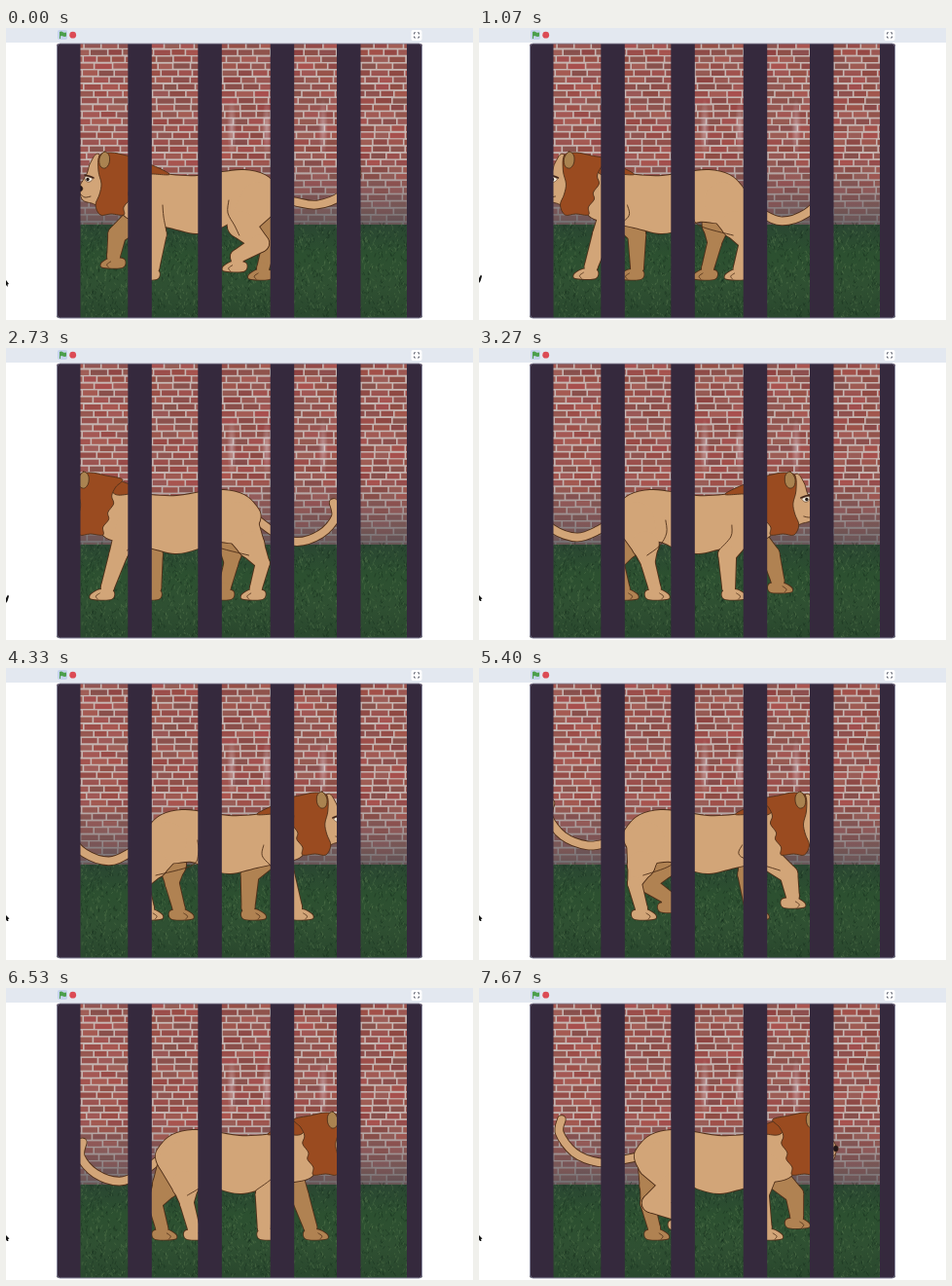
Animation of 480x300 px, one loop 8 s. Source, as an HTML page with a canvas:

```html
<!DOCTYPE html>
<html lang="en">
<head>
<meta charset="utf-8">
<title>Lion behind bars</title>
<style>
html, body { margin: 0; width: 100%; height: 100%; overflow: hidden; background: #fff; }
canvas { display: block; width: 480px; height: 300px; }
</style>
</head>
<body>
<canvas id="stage" width="480" height="300"></canvas>
<script>
const ctx = document.getElementById('stage').getContext('2d');
const LOOP = 8000, TICK = 200 / 3, STRIDE = 1540, TURN = 2700;
const FUR = '#d2a578', SHADE = '#b08252', MANE = '#9a4b20', LINE = '#50301a';

// The screen freezes now and then: [from, until] in ms
const PAUSES = [[330, 600], [2530, 2730], [3470, 3670], [4400, 4800], [5000, 5400],
  [5730, 6000], [6130, 6330], [6800, 7000], [7270, 7600], [7670, 8000]];

const mix = (a, b, k) => a + (b - a) * k;
const ease = k => k * k * (3 - 2 * k);
const wrap = v => v - Math.floor(v);

function shownTime(time) {
  const pause = PAUSES.find(([from, until]) => time > from && time <= until);
  return pause ? pause[0] : Math.floor(time / TICK + .01) * TICK;
}

// Smooth path through the given points
function curve(points, closed = true) {
  const path = new Path2D(), n = points.length;
  const at = i => closed ? points[(i + n) % n] : points[Math.min(n - 1, Math.max(0, i))];
  path.moveTo(...points[0]);
  for (let i = 0; i < (closed ? n : n - 1); i++) {
    const [a, b, c, d] = [at(i - 1), at(i), at(i + 1), at(i + 2)];
    path.bezierCurveTo(b[0] + (c[0] - a[0]) / 6, b[1] + (c[1] - a[1]) / 6,
      c[0] - (d[0] - b[0]) / 6, c[1] - (d[1] - b[1]) / 6, c[0], c[1]);
  }
  if (closed) path.closePath();
  return path;
}

// Tapered segments between joints given as [x, y, radius]
function limb(joints) {
  return joints.slice(1).map(([x, y, r], i) => {
    const [x0, y0, r0] = joints[i], path = new Path2D();
    const angle = Math.atan2(y - y0, x - x0), quarter = Math.PI / 2;
    path.arc(x0, y0, r0, angle + quarter, angle + 3 * quarter);
    path.arc(x, y, r, angle - quarter, angle + quarter);
    path.closePath();
    return path;
  });
}

function paw(x, y) {
  return curve([[x + 24, y - 8], [x + 12, y - 10], [x + 4, y - 7], [x, y - 3], [x + 3, y], [x + 22, y]]);
}

// Foot slides back on the ground, then swings forward in the air
function footfall(phase, land, leave, front, back, reach) {
  const age = wrap(phase - land), contact = wrap(leave - land);
  if (age < contact) return { x: mix(front, back, ease(age / contact) * .5 + age / contact * .5), lift: 0 };
  const swing = (age - contact) / (1 - contact), lift = Math.sin(swing * Math.PI);
  return { x: mix(back, front, ease(swing)) - reach * lift * lift, lift };
}

function foreLeg(phase) {
  const { x, lift } = footfall(phase, .72, .33, 106, 161, 37);
  const y = 258 - 12 * lift, elbow = 56 + .75 * x - 15 * lift;
  return { x, y, joint: elbow, parts: [
    ...limb([[148, 184, 14], [elbow, 212, 9], [x + 18 - 5 * lift, y - 12, 6.5], [x + 17 - 5 * lift, y - 5, 5]]),
    paw(x, y)
  ] };
}

function hindLeg(phase) {
  const { x, lift } = footfall(phase, .08, .83, 223, 266, 14);
  const y = 258 - 12 * lift, knee = 115 + .6 * x - 10 * lift;
  return { x, y, joint: knee, parts: [
    ...limb([[260, 178, 20], [knee, 202, 14], [x + 22 + 24 * lift, 221, 7 + 3 * lift],
      [x + 15, y - 11 - 6 * lift, 6 + lift], [x + 15, y - 5, 5]]),
    paw(x, y)
  ] };
}

// One shared outline around several shapes
function merge(parts, color) {
  ctx.strokeStyle = LINE;
  ctx.lineWidth = 1.8;
  parts.forEach(p => ctx.stroke(p));
  ctx.fillStyle = color;
  parts.forEach(p => ctx.fill(p));
}

function ink(points, width = .9, color = LINE) {
  ctx.strokeStyle = color;
  ctx.lineWidth = width;
  ctx.stroke(curve(points, false));
}

function shape(points, color, width = .9) {
  const path = curve(points);
  ctx.fillStyle = color;
  ctx.fill(path);
  ctx.strokeStyle = LINE;
  ctx.lineWidth = width;
  ctx.stroke(path);
}

function drawLeg(leg, color, body = []) {
  merge([...body, ...leg.parts], color);
}

function drawToes({ x, y }) {
  ink([[x + 8, y], [x + 6, y - 3], [x + 10, y - 6]], .8);
}

function drawTail(phase) {
  const drop = Math.abs(Math.sin(phase * 2 * Math.PI));
  const points = [[274, 172], [298, 177 + 13 * drop], [320, 179 + 20 * drop],
    [345, 169 + 22 * drop], [360, 149 + 25 * drop], [358, 135 + 24 * drop]];
  ink(points, 9.6);
  ink(points, 7.8, FUR);
}

function drawHead() {
  shape([[124, 134], [143, 138], [168, 150], [150, 150], [133, 150]], MANE);
  shape([[96, 130], [87, 138], [83, 150], [76, 162], [76, 169], [79, 177], [88, 180], [100, 182], [112, 160]], FUR);
  shape([[96, 131], [108, 128], [124, 131], [141, 135], [134, 143], [130, 152], [132, 160], [126, 169],
    [127, 176], [121, 184], [121, 192], [108, 191], [97, 192], [92, 182], [96, 171], [98, 160], [95, 147]], MANE);
  shape([[101, 127], [106, 131], [106, 139], [102, 144], [97, 142], [96, 134]], '#aa8350');
  shape([[81, 153], [85, 153], [89, 155], [86, 158], [82, 157]], '#f5eee0', .6);
  ctx.fillStyle = '#271b18';
  ctx.beginPath();
  ctx.arc(84, 155.5, 1.7, 0, 7);
  ctx.fill();
  ink([[81, 151], [85, 152], [90, 154]], 1.6, '#40251a');
  shape([[74, 163], [77, 162], [79, 165], [77, 168], [74, 167]], '#211719', .5);
  ink([[77, 171], [81, 174], [87, 173]]);
}

function drawLion(phase) {
  const nearFore = foreLeg(phase), nearHind = hindLeg(phase);
  const farLegs = [hindLeg(phase + .5), foreLeg(phase + .5)];
  ctx.lineJoin = ctx.lineCap = 'round';
  drawTail(phase);
  for (const leg of farLegs) {
    merge(leg.parts, SHADE);
    drawToes(leg);
  }
  const body = curve([[122, 140], [148, 146], [170, 151], [197, 152], [222, 148], [245, 146], [266, 151],
    [279, 163], [283, 174], [276, 188], [258, 200], [235, 199], [216, 207], [195, 211],
    [168, 205], [145, 200], [122, 193], [113, 168]]);
  merge([body, ...nearHind.parts, ...nearFore.parts], FUR);
  drawToes(nearHind);
  drawToes(nearFore);
  ink([[229, 177], [228, 190], [235, 203], [nearHind.joint - 2, 213]]);
  ink([[161, 182], [162, 194], [nearFore.joint + 9, 208]]);
  drawHead();
}

function makeBackdrop() {
  const canvas = document.createElement('canvas');
  canvas.width = 480;
  canvas.height = 300;
  const g = canvas.getContext('2d');
  let seed = 41;
  const rnd = () => (seed = seed * 16807 % 2147483647) / 2147483647;
  const fade = (y0, y1, ...stops) => {
    const grad = g.createLinearGradient(0, y0, 0, y1);
    stops.forEach((c, i) => grad.addColorStop(i / (stops.length - 1), c));
    return grad;
  };

  g.fillStyle = '#c6b6b2';
  g.fillRect(52, 16, 376, 190);
  for (let row = 0; row < 27; row++) {
    const y = 15 + row * 7.1;
    for (let x = 48 - (row % 2) * 9; x < 428;) {
      const w = 14 + rnd() * 5;
      g.fillStyle = `hsl(${1 + rnd() * 6}, ${28 + rnd() * 10}%, ${41 + rnd() * 8}%)`;
      g.fillRect(x, y + rnd() * .5, w - 1.6, 5.4);
      x += w;
    }
  }
  g.fillStyle = fade(135, 205, 'rgba(100,92,98,0)', 'rgba(100,92,98,.4)', 'rgba(84,84,88,.8)');
  g.fillRect(52, 135, 376, 70);
  for (const x of [232, 268, 326]) {
    g.save();
    g.translate(x, 102);
    g.scale(5, 30);
    const glow = g.createRadialGradient(0, 0, 0, 0, 0, 1);
    glow.addColorStop(0, 'rgba(222,208,214,.5)');
    glow.addColorStop(1, 'rgba(222,208,214,0)');
    g.fillStyle = glow;
    g.fillRect(-1, -1, 2, 2);
    g.restore();
  }

  g.fillStyle = fade(200, 298, '#2a4632', '#2c5030', '#2f5032', '#29472d');
  g.fillRect(52, 202, 376, 96);
  for (let i = 0; i < 2600; i++) {
    const x = 52 + rnd() * 376, y = 202 + rnd() * 96;
    g.strokeStyle = rnd() < .5 ? 'rgba(92,126,82,.38)' : 'rgba(18,40,26,.4)';
    g.beginPath();
    g.moveTo(x, y);
    g.lineTo(x + rnd() * 4 - 2, y - 1 - rnd() * 3);
    g.stroke();
  }
  return canvas;
}
const backdrop = makeBackdrop();

function roundBox(x, y, w, h, r, color) {
  ctx.fillStyle = color;
  ctx.beginPath();
  ctx.roundRect(x, y, w, h, r);
  ctx.fill();
}

function drawToolbar() {
  ctx.fillStyle = '#e3e8f0';
  ctx.fillRect(0, 0, 480, 15);
  roundBox(53, 2, 10, 10, 2, '#c5d3ec');
  ctx.fillStyle = '#4b9f4d';
  ctx.fill(new Path2D('M55 4 Q57 3 58.5 4.2 T62 4.4 V8.6 Q60 9.4 58.5 8.5 T56 8.6 V11 H55Z'));
  roundBox(65.3, 3.8, 6.8, 6.8, 3.4, '#dc4b55');
  roundBox(416.5, 2, 11, 11, 2, '#fff');
  ctx.strokeStyle = '#666a77';
  ctx.lineWidth = 1;
  ctx.stroke(new Path2D('M419.5 6.5V4.8H421M423 4.8H424.5V6.5M424.5 8.5V10H423M421 10H419.5V8.5'));
}

function drawPointer(time) {
  ctx.fillStyle = '#111';
  if (time < 200) ctx.fill(new Path2D('M0 259L3 263L1.5 263.5L2 266L0 264Z'));
  else if (time < 2800) ctx.fill(new Path2D('M0 257L2 253.5L3 255L1.5 260L0 262Z'));
  else ctx.fill(new Path2D('M0 254L3.5 257.5L2 258L2.5 260L1 260L0 258.5Z'));
}

function draw(time) {
  const shown = shownTime(time), leftward = shown < TURN;
  const x = leftward ? 218 - .008 * shown : 200 + .005 * (shown - TURN);
  ctx.fillStyle = '#fff';
  ctx.fillRect(0, 0, 480, 300);
  drawToolbar();

  ctx.save();
  ctx.beginPath();
  ctx.roundRect(52, 16, 376, 282, 3);
  ctx.clip();
  ctx.drawImage(backdrop, 0, 0);
  ctx.save();
  ctx.translate(x, 0);
  ctx.scale(leftward ? 1 : -1, 1);
  ctx.translate(-218, 0);
  drawLion(shown / STRIDE + .02);
  ctx.restore();
  ctx.fillStyle = '#35293d';
  for (const left of [52, 125.3, 197.3, 271.7, 340, 412]) ctx.fillRect(left, 16, 24.5, 282);
  ctx.restore();

  ctx.strokeStyle = '#85849a';
  ctx.lineWidth = 1;
  ctx.beginPath();
  ctx.roundRect(52.5, 16, 375, 282, 3);
  ctx.stroke();
  drawPointer(time);
}

const began = performance.now();
function tick() {
  draw((performance.now() - began) % LOOP);
  requestAnimationFrame(tick);
}
tick();
</script>
</body>
</html>
```
